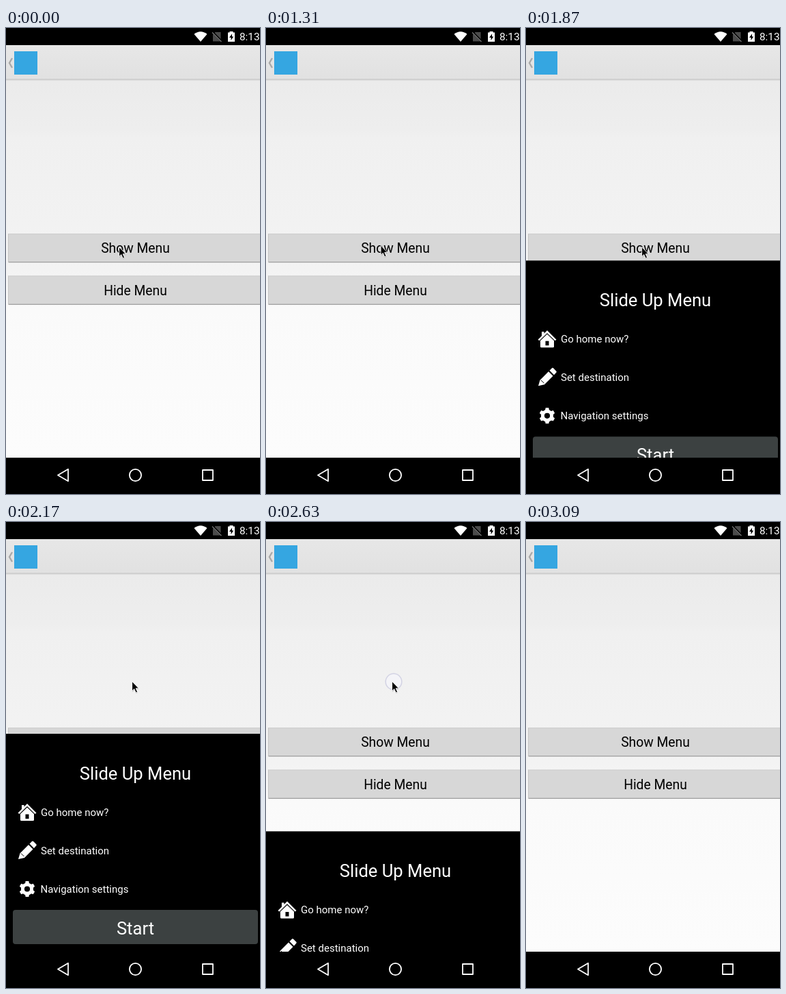
Recreate the animation shown at these times as an HTML page. Size 372x680 px, loop 3.9 s.

```html
<!DOCTYPE html>
<html lang="en">
<head>
<meta charset="utf-8">
<title>Slide up menu</title>
<style>
  html, body { margin: 0; width: 100%; height: 100%; overflow: hidden; background: #000; }
  svg { display: block; width: 372px; height: 680px; }
  text { font-family: Roboto, sans-serif; }
  .mid { text-anchor: middle; }
  .button { font-size: 19.3px; }
  .title { font-size: 25.6px; }
  .item { font-size: 15px; }
</style>
</head>
<body>
<svg viewBox="0 0 372 680">
  <defs>
    <linearGradient id="page" gradientUnits="userSpaceOnUse" x1="0" y1="77" x2="0" y2="627">
      <stop offset="0" stop-color="#ebebeb"/>
      <stop offset=".13" stop-color="#eee"/>
      <stop offset=".15" stop-color="#f0f0f0"/>
      <stop offset=".5" stop-color="#f3f3f3"/>
      <stop offset=".6" stop-color="#fafafa"/>
      <stop offset="1" stop-color="#fcfcfc"/>
    </linearGradient>
    <linearGradient id="bar" x2="0" y2="1">
      <stop offset="0" stop-color="#e7e7e7"/>
      <stop offset="1" stop-color="#e1e1e1"/>
    </linearGradient>
    <g id="plate">
      <rect x="3" width="380" height="42" rx="1" fill="#d7d7d7"/>
      <path d="M3.5 0V41" stroke="#c6c6c6"/>
      <path d="M3 .5H372" stroke="#cdcdcd"/>
      <path d="M3.5 41.7H372" stroke="#8c8c8c" stroke-width="1.1"/>
    </g>
  </defs>

  <rect y="25" width="372" height="602" fill="url(#page)"/>
  <rect y="25" width="372" height="50" fill="url(#bar)"/>
  <rect y="74" width="372" height="2" fill="#d0d0d0"/>
  <rect y="76" width="372" height="1" fill="#e0e0e0"/>
  <path d="M9 44L5 51L9 58" fill="none" stroke="#a9a9a9" stroke-width="2.4"/>
  <rect x="12" y="34" width="34" height="34" fill="#35a6e1"/>

  <use href="#plate" y="300"/>
  <text class="mid button" x="189.5" y="328">Show Menu</text>
  <use href="#plate" y="361.5"/>
  <text class="mid button" x="189.5" y="389.6">Hide Menu</text>

  <g id="menu" fill="#fff">
    <rect width="372" height="330" fill="#000"/>
    <text class="mid title" x="189.5" y="67">Slide Up Menu</text>
    <path d="M31 102L44.5 115.5L42.5 117L31 105.8L19.5 117L17.5 115.5L23 110V104H26.5V106.5Z"/>
    <path fill-rule="evenodd" d="M31 107.5L41 117V125.5Q41 127 39.5 127H22.5Q21 127 21 125.5V117ZM28.5 117.5V124H33.5V117.5Z"/>
    <path d="M18 183L20.5 174.5L33 162L39.5 168.5L27 181Z"/>
    <path d="M34.5 160.5L38 157Q39 156 40 157L44.3 161.3Q45.3 162.3 44.3 163.3L41 167Z"/>
    <path d="M22 174.5L26.5 179" stroke="#000"/>
    <g transform="translate(31 226.5)">
      <g id="teeth"></g>
      <circle r="6.6" fill="none" stroke="#fff" stroke-width="5"/>
    </g>
    <text class="item" x="51" y="119.6">Go home now?</text>
    <text class="item" x="51" y="175.6">Set destination</text>
    <text class="item" x="50.5" y="232">Navigation settings</text>
    <rect x="10" y="257" width="359" height="50" rx="4" fill="#3c4141"/>
    <text class="mid title" x="189.5" y="293">Start</text>
  </g>

  <rect width="372" height="25" fill="#000"/>
  <path d="M275.5 9Q285 1.5 294.5 9L285 20Z" fill="#fff"/>
  <path d="M306.5 6H314.5V19.5H303V9.5Z" fill="#4b4b4b"/>
  <path d="M302 5.5L316 19.5" stroke="#000" stroke-width="3"/>
  <path d="M302 6.5L315.5 20" stroke="#777" stroke-width="1.3"/>
  <path d="M327.5 5H332.5V6.5H335V20H325V6.5H327.5Z" fill="#fff"/>
  <path d="M331 8.5L327 14H329.5V18L333.2 12.5H331Z" fill="#000"/>
  <text x="342" y="18.3" font-size="15.3" fill="#fff">8:13</text>

  <rect y="627" width="372" height="53" fill="#000"/>
  <g fill="none" stroke="#fff" stroke-width="1.8" stroke-linejoin="round">
    <path d="M76 652.5L91 643.8V661.2Z"/>
    <circle cx="189.5" cy="652.5" r="8.6"/>
    <rect x="288" y="645" width="15" height="15"/>
  </g>

  <circle id="ring" r="11.8" fill="#f5f5fb" fill-opacity=".62" stroke="#d3d3e4" stroke-width="1.5"/>
  <g id="cursor">
    <path d="M1 2V16L4 13.2L6.4 18.2L9 17L6.6 12.2H11Z" fill="#000" opacity=".18"/>
    <path d="M.6.6V14.6L3.8 11.6L6.2 17L8.6 16L6.2 10.8H10.4Z" fill="#000" stroke="#fff" stroke-width=".9"/>
  </g>
</svg>
<script>
  const LOOP = 3900, STEP = 60, SLIDE = 300;
  const OPEN = 309, CLOSED = 627;
  const SHOW = 1630, HIDE = 2490;

  // The screen refreshes in steps, counted from the latest of these times.
  const anchors = [0, 180, 500, 1310, 1520, 1630, 2500, 2570, 2970];

  // Pointer path: time, x, y
  const path = [
    [120, 165, 319], [500, 167, 314.5], [1250, 167, 314.5], [1370, 168, 319],
    [1750, 168, 319], [1870, 169, 319], [1930, 169, 319], [1990, 174, 300],
    [2050, 178, 272], [2110, 182, 246], [2170, 184, 232], [2750, 184, 232],
    [2810, 185, 250], [2870, 191, 408], [2930, 228, 565], [2970, 253, 568],
    [3030, 268, 637]
  ];
  const GONE = 3090;

  const taps = [
    { at: 1520, x: 170.8, y: 321.5 },
    { at: 2500, x: 187, y: 233 }
  ];

  const $ = id => document.getElementById(id);
  const menu = $("menu"), ring = $("ring"), cursor = $("cursor");
  const clamp = v => Math.min(1, Math.max(0, v));
  const mix = (a, b, k) => a + (b - a) * k;
  const ease = k => (1 - Math.cos(Math.PI * clamp(k))) / 2;
  const move = (el, x, y) => el.setAttribute("transform", `translate(${x} ${y})`);

  $("teeth").innerHTML = [0, 60, 120, 180, 240, 300].map(a =>
    `<path d="M-3.2 -7L-2.3 -11.5H2.3L3.2 -7Z" transform="rotate(${a})"/>`).join("");

  function hold(t) {
    const start = anchors.filter(a => a <= t).pop();
    return start + Math.floor((t - start) / STEP) * STEP;
  }

  function pointAt(t) {
    const i = path.findIndex(p => p[0] > t);
    if (i === 0) return path[0].slice(1);
    if (i < 0) return path[path.length - 1].slice(1);
    const [t0, x0, y0] = path[i - 1], [t1, x1, y1] = path[i];
    const k = (t - t0) / (t1 - t0);
    return [mix(x0, x1, k), mix(y0, y1, k)];
  }

  function draw(time) {
    const t = hold(time % LOOP);

    const shown = ease((t - SHOW) / SLIDE) - ease((t - HIDE) / SLIDE);
    move(menu, 0, mix(CLOSED, OPEN, shown));

    move(cursor, ...pointAt(t));
    cursor.setAttribute("visibility", t < GONE ? "visible" : "hidden");

    const tap = taps.find(p => t >= p.at && t < p.at + 300);
    ring.setAttribute("opacity", tap ? clamp((tap.at + 300 - t) / 120) : 0);
    if (tap) move(ring, tap.x, tap.y);
  }

  const begin = performance.now();
  function frame() {
    draw(performance.now() - begin);
    requestAnimationFrame(frame);
  }
  frame();
</script>
</body>
</html>
```
